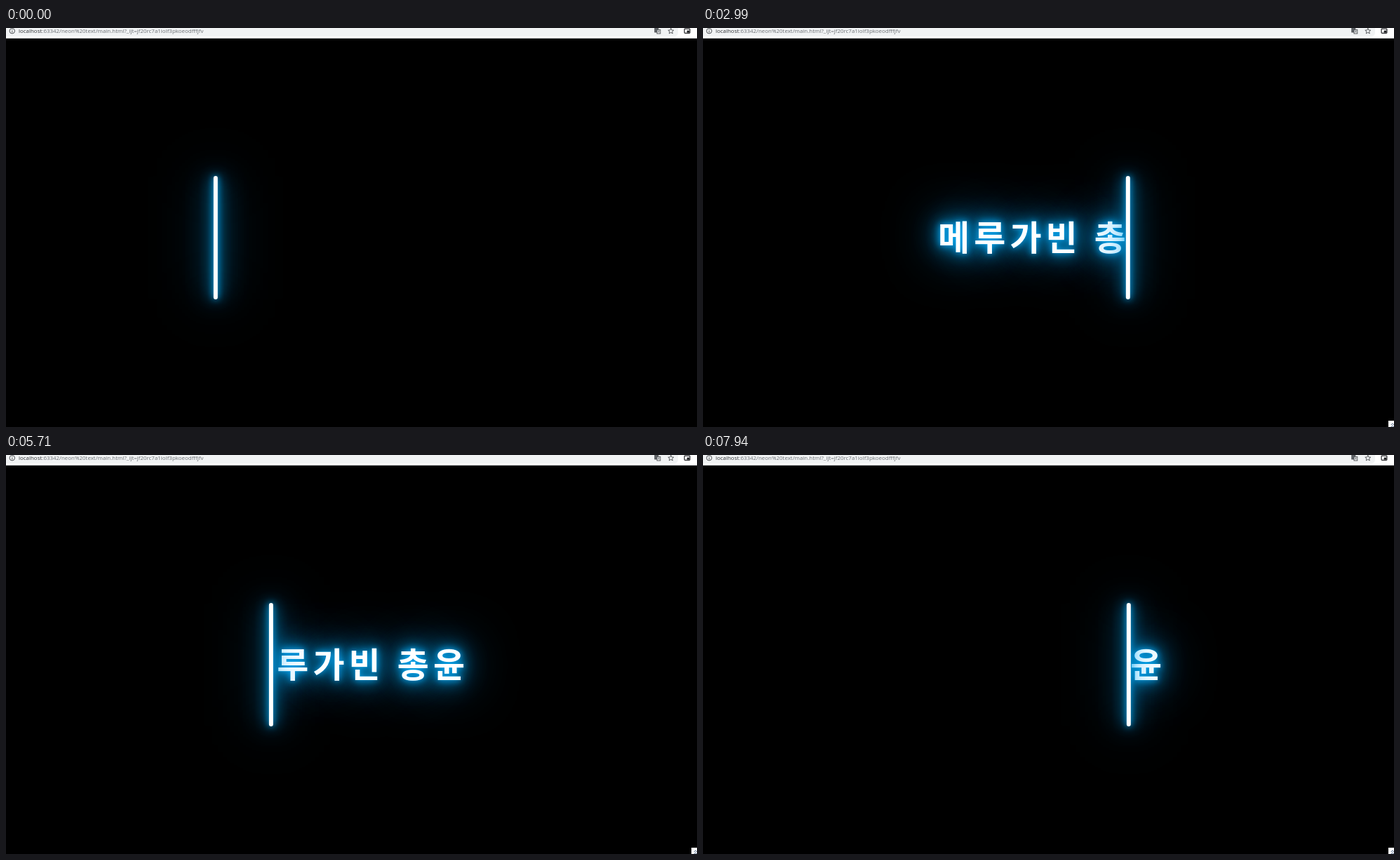
Write an HTML page that moves like this. It is 985 px wide and 569 px high and loops after 8 s.

```html
<!DOCTYPE html>
<html lang="ko">
<head>
<meta charset="utf-8">
<title>neon text</title>
<style>
  html, body { margin: 0; width: 100%; height: 100%; overflow: hidden; background: #000; }
  #stage { position: relative; width: 985px; height: 569px; overflow: hidden; background: #000; }
  #stage > * { position: absolute; left: 0; top: 0; }
  #words { width: 985px; height: 569px; }
  #words span {
    position: absolute; top: 266px; line-height: 60px; white-space: pre;
    font: 700 49px/60px "Noto Sans CJK KR", "Noto Sans KR", "Noto Sans CJK", sans-serif;
    color: #fff;
  }
  #words .glow {
    color: #03a9f4;
    text-shadow: 0 0 10px #03a9f4, 0 0 20px #03a9f4, 0 0 40px #03a9f4, 0 0 80px #03a9f4;
  }
  #bar {
    width: 6px; border-radius: 3px; background: #fff;
    box-shadow: 0 0 10px #03a9f4, 0 0 20px #03a9f4, 0 0 40px #03a9f4, 0 0 80px #03a9f4;
  }
  #url { font: 7.94px "Open Sans", sans-serif; font-variant-ligatures: none; fill: #6a6e73; }
</style>
</head>
<body>
<div id="stage">
  <div id="words"></div>
  <div id="bar"></div>
  <svg width="985" height="569" fill="none">
    <rect width="985" height="15" fill="#fff"/>
    <path d="M0 0H958V6Q958 12 952 12H0Z" fill="#f1f3f4"/>
    <path d="M0 14.5H985" stroke="#d5d7da"/>
    <g stroke="#4a4d51">
      <circle cx="8.8" cy="4.2" r="3.7"/>
      <path d="M8.8 3.7V6.5M8.8 1.8V2.8"/>
    </g>
    <text id="url" x="18" y="7"><tspan fill="#303236">localhost</tspan>:63342/neon%20text/main.html?_ijt=jf20rc7a1iolf3pkoeodfffjfv</text>
    <g stroke="#4a4d51" stroke-width=".9">
      <rect x="924.8" y="0.2" width="5" height="5.8" fill="#5f6368"/>
      <rect x="928" y="2.4" width="4.8" height="5.6" fill="#f1f3f4"/>
      <path d="M929.2 4.2H931.7M930.4 3.6V4.2M931.3 4.3L929.4 6.6M929.7 4.8L931.6 6.6" stroke-width=".6"/>
      <path d="M947.8 .3L948.9 3L951.8 3.2L949.6 5.1L950.3 7.9L947.8 6.4L945.3 7.9L946 5.1L943.8 3.2L946.7 3Z"/>
    </g>
    <rect x="967.1" y="1.1" width="7.8" height="6.2" rx=".8" stroke="#202124" stroke-width="1.2"/>
    <rect x="970.6" y="3.6" width="3.6" height="3" fill="#202124"/>
    <g id="corner">
      <rect x="977" y="560" width="8" height="9" fill="#fff"/>
      <path d="M980.8 566L982.8 564L984.8 566M980.8 569L982.8 567L984.8 569" stroke="#27446b" stroke-width=".9"/>
    </g>
  </svg>
</div>
<script>
const LOOP = 8000, PERIOD = 4940, LEAD = 326;
const GROW = 292, MOVE = 3954, SHRINK = 244;
const X0 = 295.3, X1 = 701.3, MID = 299, TALL = 176;
const STEP = 51.2, GAP = 18;

const byId = id => document.getElementById(id);
const clamp = v => Math.max(0, Math.min(1, v));
const words = byId('words'), bar = byId('bar'), corner = byId('corner');

const letters = [...'메루가빈총윤'].map((ch, i) => ({
  ch, x: 335 + STEP * i + (i > 3 ? GAP : 0), nodes: []
}));

// All glows lie below all of the white glyphs.
for (const kind of ['glow', 'face']) {
  for (const letter of letters) {
    const span = document.createElement('span');
    span.className = kind;
    span.textContent = letter.ch;
    span.style.left = letter.x + 'px';
    words.append(span);
    letter.nodes.push(span);
  }
}

function draw(t) {
  const total = t + LEAD;
  const hiding = Math.floor(total / PERIOD) % 2 === 1;
  const u = total % PERIOD;
  const p = clamp((u - GROW) / MOVE);
  const x = X0 + (X1 - X0) * p;
  const size = Math.min(clamp(u / GROW), clamp((GROW + MOVE + SHRINK - u) / SHRINK));
  const h = TALL * size;

  bar.style.display = h > 0 ? '' : 'none';
  bar.style.height = h + 'px';
  bar.style.transform = `translate(${x - 3}px, ${MID - h / 2}px)`;

  const moving = p > 0 && p < 1;
  words.style.clipPath = !moving ? 'none'
    : hiding ? `inset(0 0 0 ${x}px)` : `inset(0 ${985 - x}px 0 0)`;

  for (const { x: left, nodes } of letters) {
    const passed = clamp((x - left) / STEP);
    const shown = hiding ? 1 - passed : passed;
    const alpha = shown > 0 ? 0.35 + 0.65 * shown : 0;
    for (const node of nodes) node.style.opacity = alpha;
  }
  corner.style.display = t >= 420 ? '' : 'none';
}

let start;
function tick(now) {
  start ??= now;
  draw((now - start) % LOOP);
  requestAnimationFrame(tick);
}
draw(0);
requestAnimationFrame(tick);
</script>
</body>
</html>
```
